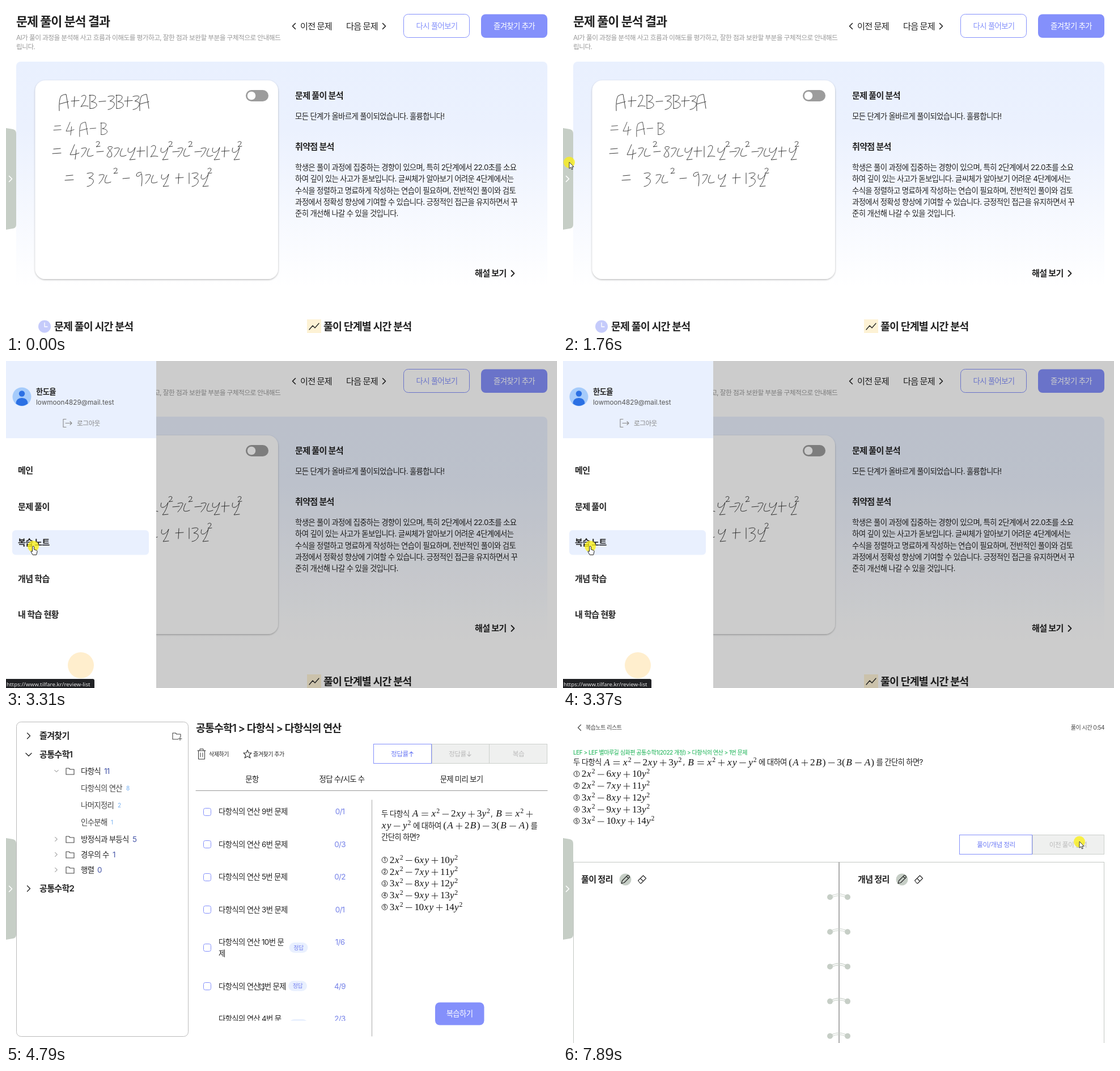
Write an HTML page that moves like this. It is 972x576 px and loops after 8 s.

```html
<!DOCTYPE html>
<html lang="ko">
<head>
<meta charset="utf-8">
<title>복습 노트</title>
<style>
html, body { margin: 0; width: 100%; height: 100%; overflow: hidden; background: #fff; }
svg { display: block; width: 972px; height: 576px; }
text { font-family: Inter, "Noto Sans CJK KR", "Noto Sans CJK", sans-serif; letter-spacing: -.05em; }
.math { font-family: "Liberation Serif", serif; letter-spacing: 0; }
.url { font-family: "Noto Sans", sans-serif; letter-spacing: 0; }
.mail text { letter-spacing: 0; }
.line { fill: none; stroke-linecap: round; stroke-linejoin: round; }

/* 8 s loop: 1% = 80 ms */
.step { animation: 8s step-end infinite; }
#result { animation-name: result; }
#list { animation-name: list; }
#note { animation-name: note; }
#empty { animation-name: empty; }
#preview { animation-name: preview; }
#picked { animation-name: picked; }
#status { animation-name: status; }
#halo { animation-name: halo; }
#arrow { animation-name: arrow; }
#hand { animation-name: status; }
#dim { animation: dim 8s linear infinite; }
#drawer { animation: drawer 8s linear infinite; }
#cursor { animation: cursor 8s linear infinite; }

@keyframes result { 0% { opacity: 1 } 42.5%, to { opacity: 0 } }
@keyframes list { 0% { opacity: 0 } 42.5% { opacity: 1 } 80.87%, to { opacity: 0 } }
@keyframes note { 0% { opacity: 0 } 80.87%, to { opacity: 1 } }
@keyframes empty { 0% { opacity: 1 } 59.8%, to { opacity: 0 } }
@keyframes preview { 0% { opacity: 0 } 59.8%, to { opacity: 1 } }
@keyframes picked { 0% { opacity: 0 } 41.3%, to { opacity: 1 } }
@keyframes status { 0% { opacity: 0 } 31.2% { opacity: 1 } 49.6%, to { opacity: 0 } }
@keyframes arrow {
  0% { opacity: 0 } 2.37% { opacity: 1 } 14.37% { opacity: 0 } 18.5% { opacity: 1 }
  31.2% { opacity: 0 } 49.6%, to { opacity: 1 }
}
@keyframes halo {
  0% { opacity: 0 } 20.2% { opacity: 1 } 22.7% { opacity: 0 } 41.3% { opacity: 1 } 43% { opacity: 0 }
  58.2% { opacity: 1 } 59.8% { opacity: 0 } 78.9% { opacity: .8 } 80.87% { opacity: 0 } 97%, to { opacity: 1 }
}
@keyframes dim {
  0%, 22.5% { opacity: 0; animation-timing-function: ease-out }
  24.2%, 42.1% { opacity: 1; animation-timing-function: ease-in-out }
  45.6%, to { opacity: 0 }
}
@keyframes drawer {
  0%, 22.6% { transform: translateX(-266px); animation-timing-function: cubic-bezier(0, 0, .2, 1) }
  26.1%, 42.1% { transform: none; animation-timing-function: cubic-bezier(.4, 0, .6, 1) }
  45.6%, to { transform: translateX(-266px) }
}
@keyframes cursor {
  0%, 2.3% { transform: translate(886px, 566px); animation-timing-function: ease-in-out }
  10.25%, 17.6% { transform: translate(-2px, 284px) }
  20.2%, 27.8% { transform: translate(11px, 275px); animation-timing-function: ease-in-out }
  36.2%, 48.1% { transform: translate(48px, 326px); animation-timing-function: ease-in-out }
  54.9%, 62.5% { transform: translate(448px, 471px); animation-timing-function: ease-in-out }
  73.2%, 85.2% { transform: translate(793px, 526px); animation-timing-function: ease-in }
  88.2% { transform: translate(773px, 465px); animation-timing-function: ease-out }
  95.2% { transform: translate(902px, 237px) }
  96.2%, to { transform: translate(911px, 221px) }
}
</style>
</head>
<body>
<svg id="stage" viewBox="0 0 972 576"></svg>
<script>
const BLUE = '#8490fb', INK = '#222', GREY = '#bbb', SAGE = '#c6cec6', PALE = '#eff0ef', SKY = '#e9f0fe';
// type scale
const XS = 10.05, S = 11.72, M = 13.4, L = 15.1, XL = 18.4, XXL = 21.8;

// y is the visual middle of the line
const text = (x, y, size, str, fill = INK, weight = 400, anchor = 'start') =>
  `<text x="${x}" y="${y + size * .36}" font-size="${size}" fill="${fill}" font-weight="${weight}" text-anchor="${anchor}">${str.replace(/>/g, '&gt;')}</text>`;
const mid = (x, y, size, str, fill, weight) => text(x, y, size, str, fill, weight, 'middle');
const rect = (x, y, w, h, r, fill, stroke = 'none') =>
  `<rect x="${x}" y="${y}" width="${w}" height="${h}" rx="${r}" fill="${fill}" stroke="${stroke}"/>`;
const disc = (x, y, r, fill, stroke = 'none') => `<circle cx="${x}" cy="${y}" r="${r}" fill="${fill}" stroke="${stroke}"/>`;
const line = (d, stroke = INK, width = 1.1, x = 0, y = 0, scale = 1) =>
  `<path class="line" d="${d}" stroke="${stroke}" stroke-width="${width}" transform="translate(${x} ${y}) scale(${scale})"/>`;
const group = (id, body, cls = 'step') => `<g id="${id}" class="${cls}">${body}</g>`;
const right = (x, y, s = 5, c = INK, w = 1.6) => line(`M${-s / 2} ${-s}L${s / 2} 0 ${-s / 2} ${s}`, c, w, x, y);
const left = (x, y, s = 5, c = INK, w = 1.6) => line(`M${s / 2} ${-s}L${-s / 2} 0 ${s / 2} ${s}`, c, w, x, y);
const down = (x, y, s = 5, c = INK, w = 1.3) => line(`M${-s} ${-s / 2}L0 ${s / 2} ${s} ${-s / 2}`, c, w, x, y);

// handwriting, each glyph drawn around its middle line
const pen = {
  'A': 'M1 16Q0-3 4-10Q9-13 13-13Q15-2 17 12M2 4 17 0',
  'B': 'M1-12V12M0-11Q12-13 11-7Q9-1 3 0Q14 1 13 7Q9 13 1 12',
  '+': 'M0-1 14-2M6-9 5 9',
  '-': 'M0 0 12-1',
  '=': 'M2-5 14-6M0 3 15 2',
  '1': 'M1-10V9',
  '2': 'M1-9Q7-14 9-9Q9-3 0 9Q5 6 13 8',
  '3': 'M0-9Q10-12 11-8Q9-3 3-1Q13 0 11 6Q8 13 0 14',
  '4': 'M8-13Q4-3 0 5Q8 6 16 2M11-4Q10 6 9 13',
  '8': 'M10-9Q2-11 3-6Q12 2 9 8Q4 11 1 7Q2 2 11-8',
  '9': 'M9-11Q0-12 0-5Q3-1 9-9Q11 0 9 13',
  'x': 'M0-6Q10-9 9-5Q6 3 0 9M14-6Q9 3 11 7Q14 9 21 6',
  'y': 'M2-7Q-1 2 5 1Q11-1 14-8Q11 6 4 14L14 13',
  '^': 'M0-17Q4-20 6-17Q6-13 0-9L7-10'
};
const write = (y, str, xs, scale) => [...str].map((c, i) => line(pen[c], '#3a3a3a', 1, xs[i], y, scale)).join('');

// math typesetting with advances in em
const EM = 16.2;
const advance = { x: .572, y: .526, A: .75, B: .809, '(': .389, ')': .389 };
function math(x, y, str) {
  let out = '', raised = false;
  for (const c of str) {
    if (c === '^') { raised = true; continue; }
    if ('+-='.includes(c)) {
      const gap = c === '=' ? .278 : .222, a = x + (gap + .06) * EM, w = .66 * EM;
      const d = { '+': `M0 0h${w}M${w / 2} ${-w / 2}v${w}`, '-': `M0 0h${w}`, '=': `M0-2h${w}M0 2h${w}` }[c];
      out += line(d, INK, .9, a, y + 1);
      x += (.778 + 2 * gap) * EM;
      continue;
    }
    const w = (raised ? .4 : advance[c] ?? .5) * EM, style = /[a-zA-Z]/.test(c) ? 'italic' : 'normal';
    out += `<text class="math" x="${x + w / 2}" y="${raised ? y - .9 : y + 5.3}" font-size="${raised ? EM * .72 : EM * 1.06}" font-style="${style}" text-anchor="middle" fill="#111">${c}</text>`;
    x += w;
    raised = false;
  }
  return out;
}
const options = (x, y) => ['2x^2-6xy+10y^2', '2x^2-7xy+11y^2', '3x^2-8xy+12y^2', '3x^2-9xy+13y^2', '3x^2-10xy+14y^2']
  .map((o, i) => {
    const row = y + i * 20.75;
    return disc(x + 6, row, 4.9, 'none', INK) + mid(x + 5.8, row, 7.5, `${i + 1}`, INK, 600) + math(x + 15, row, o);
  }).join('');
const polyA = 'A=x^2-2xy+3y^2', goal = '(A+2B)-3(B-A)';

const result = [
  text(18, 27, XXL, '문제 풀이 분석 결과', INK, 600),
  text(18, 55.5, S, 'AI가 풀이 과정을 분석해 사고 흐름과 이해도를 평가하고, 잘한 점과 보완할 부분을 구체적으로 안내해드', '#999'),
  text(18, 72, S, '립니다.', '#999'),
  left(508, 35.5), text(519, 35.5, L, '이전 문제', INK, 500),
  text(600, 35.5, L, '다음 문제', INK, 500), right(667, 35.5),
  rect(701.5, 14.5, 116, 41, 8, '#fff', BLUE), mid(760, 35.5, M, '다시 풀어보기', BLUE),
  rect(838, 14.5, 117, 41.5, 8, BLUE), mid(896.5, 35.5, M, '즐겨찾기 추가', '#fff'),
  rect(18, 98, 937, 478, 8, 'url(#fade)'),
  `<g filter="url(#soft)">${rect(51.5, 131, 428.5, 350, 18, '#fff')}</g>`,
  rect(423, 148, 40, 20, 10, '#9c9c9c'), disc(433, 158, 7.3, '#fff'),
  write(168.5, 'A+2B-3B+3A', [93, 115, 132, 147, 164, 180, 194, 209, 224, 235]),
  write(216, '=4A-B', [84, 106, 129, 148, 167], .88),
  write(257, '=4x^-8xy+12y^-x^-xy+y^', [82, 113, 133, 159, 160, 177, 191, 214, 231, 248, 255, 272, 287, 294, 303, 322, 333, 344, 363, 380, 398, 409]),
  write(304, '=3x^-9xy+13y^', [104, 143, 164, 190, 206, 230, 246, 273, 299, 322, 328, 343, 356]),
  text(510, 158, L, '문제 풀이 분석', INK, 600),
  text(510, 194.5, M, '모든 단계가 올바르게 풀이되었습니다. 훌륭합니다!'),
  text(510, 248, L, '취약점 분석', INK, 600),
  ...['학생은 풀이 과정에 집중하는 경향이 있으며, 특히 2단계에서 22.0초를 소요',
    '하여 깊이 있는 사고가 돋보입니다. 글씨체가 알아보기 어려운 4단계에서는',
    '수식을 정렬하고 명료하게 작성하는 연습이 필요하며, 전반적인 풀이와 검토',
    '과정에서 정확성 향상에 기여할 수 있습니다. 긍정적인 접근을 유지하면서 꾸',
    '준히 개선해 나갈 수 있을 것입니다.'].map((s, i) => text(510, 284.5 + i * 20.1, M, s)),
  text(827, 471, L, '해설 보기', INK, 600), right(894, 471, 5, INK, 1.8),
  disc(68, 564.5, 11, '#c5cbfb'), line('M0-6V1H5', '#fff', 1.3, 68, 564),
  text(85, 564, XL, '문제 풀이 시간 분석', INK, 600),
  rect(531, 552, 25, 24, 0, '#fdf2d5'), line('M535 570 541 563 545 567 552 559', INK, 1.3),
  text(560, 564, XL, '풀이 단계별 시간 분석', INK, 600)
].join('');

const folder = (x, y) => line('M-7-5H-2L0-3H7V6H-7Z', '#444', 1.1, x, y);
const branch = (y, name, count, countX, open) =>
  (open ? down(89, y, 3.2, '#777', 1) : right(88.5, y, 3.6, '#777', 1)) +
  folder(113, y) + text(132, y, M, name) + text(countX, y, M, count, '#4656a8');
const leaf = (y, name, count, countX) => text(132, y, M, name, '#444') + text(countX, y, XS, count, '#74aef0');
const row = (y, name, score, box = y) =>
  rect(348.5, Math.round(box) - 6.5, 13, 13, 3, '#fff', BLUE) + text(375, y, M, `다항식의 연산 ${name}`) + mid(589, y, M, score, '#7480e8');
const badge = (x, y) => rect(x - 16.5, y - 9, 33, 18, 9, SKY) + mid(x, y, XS, '정답', '#7784f0');
const button = (fill, ink) => rect(757, 504.5, 86.5, 40, 8, fill) + mid(800, 524.5, M, '복습하기', ink);

const list = [
  rect(18.5, 10.5, 303, 554, 8, '#fff', '#bbb'),
  right(40, 35, 5, INK, 1.3), text(59, 35, L, '즐겨찾기', INK, 600),
  folder(301, 35), rect(304, 37, 6, 6, 0, '#fff'), line('M0-3V3M-3 0H3', '#444', 1, 307, 40),
  down(40, 68), text(59, 68, L, '공통수학1', INK, 600),
  branch(97, '다항식', '11', 173, true),
  leaf(127, '다항식의 연산', '8', 212), leaf(157, '나머지정리', '2', 197), leaf(187, '인수분해', '1', 185),
  branch(217, '방정식과 부등식', '5', 223), branch(244, '경우의 수', '1', 188), branch(271, '행렬', '0', 161),
  right(40, 304, 5, INK, 1.3), text(59, 304, L, '공통수학2', INK, 600),
  text(335, 21, XL, '공통수학1 > 다항식 > 다항식의 연산', INK, 600),
  line('M-7-6H7M-3-6V-9H3V-6M-5.5-6V9H5.5V-6M-2-2V5M2-2V5', '#333', 1, 345, 67),
  text(358, 67, XS, '삭제하기'),
  line('M0-7 2-2 7-2 3 2 5 7 0 4-5 7-3 2-7-2-2-2Z', '#333', 1.1, 426, 67),
  text(436, 67, XS, '즐겨찾기 추가'),
  rect(751.5, 49.5, 101, 34, 0, PALE, '#ccd0cc'), rect(852.5, 49.5, 102, 34, 0, PALE, '#ccd0cc'),
  rect(648.5, 49.5, 102, 34, 0, '#fff', BLUE),
  text(679, 67, S, '정답률', '#6f7df5'), line('M0 4.5V-4M-3-1 0-4 3-1', '#6f7df5', 1.1, 715, 67),
  text(781, 67, S, '정답률', GREY), line('M0-4.5V4M-3 1 0 4 3 1', GREY, 1.1, 817, 67),
  mid(904, 67, S, '복습', GREY),
  mid(434, 111, M, '문항', INK, 500), mid(592.5, 111, M, '정답 수/시도 수', INK, 500), mid(803.5, 111, M, '문제 미리 보기', INK, 500),
  line('M335 131.5H955', '#999', 1), line('M645.5 148V564', '#aaa', 1),
  '<g clip-path="url(#rows)">',
  row(168.5, '9번 문제', '0/1'), row(226, '6번 문제', '0/3'), row(283.5, '5번 문제', '0/2'), row(341, '3번 문제', '0/1'),
  row(398, '10번 문', '1/6', 408), text(375, 418, M, '제'), badge(516, 408),
  row(476, '1번 문제', '4/9'), badge(514.5, 475.5),
  row(533, '4번 문', '2/3', 550), badge(516, 543), '</g>',
  group('empty', mid(800.5, 319.5, M, '문제를 선택해주세요', '#888') + button(PALE, '#aaa')),
  group('preview', [
    button(BLUE, '#fff'),
    text(662, 172, M, '두 다항식'), math(716, 172, polyA), text(855, 172, M, ','), math(863, 172, 'B=x^2+'),
    math(662, 193, 'xy-y^2'), text(718, 193, M, '에 대하여'), math(771, 193, goal), text(925.5, 193, M, '를'),
    text(662, 213, M, '간단히 하면?'), options(662, 253.5)
  ].join(''))
].join('');

const tools = x => disc(x, 288, 10.5, SAGE) +
  line('M-7 7-5.5 2 4-7.5Q7-7 7.5-4L-2 5.5ZM2-5.5 5.5-2', INK, 1.1, x, 288) +
  line('M-7 2 2-7 7-2-2 7H-3ZM-3-2 2 3', INK, 1.1, x + 29.5, 288);
const ring = y => disc(471, y, 5, SAGE) + disc(502, y, 5, SAGE) +
  line('M471-1Q487-10 502-1M473 1Q487-6 500 1', SAGE, 1.1, 0, y);

const note = [
  left(29, 20.5, 5, '#444', 1.2), text(40, 20.5, XS, '복습노트 리스트', '#444'),
  text(955, 20.5, XS, '풀이 시간 0:54', '#444', 400, 'end'),
  text(18, 64.5, XS, 'LEF > LEF 별마루길 심화편 공통수학1(2022 개정) > 다항식의 연산 > 1번 문제', '#12b04f'),
  text(18, 81.5, M, '두 다항식'), math(71.5, 81.5, polyA), text(211.5, 81.5, M, ','), math(219, 81.5, 'B=x^2+xy-y^2'),
  text(345, 81.5, M, '에 대하여'), math(398, 81.5, goal), text(552.5, 81.5, M, '를 간단히 하면?'),
  options(18, 102),
  rect(828.5, 209.5, 126, 34, 0, PALE, '#ccd0cc'), rect(699.5, 209.5, 128, 34, 0, '#fff', BLUE),
  mid(764, 227, S, '풀이/개념 정리', '#6f7df5'), mid(891, 227, S, '이전 풀이 분석', GREY),
  rect(18.5, 257.5, 936, 340, 0, '#fff', '#c4c8c4'), line('M487 258V580', '#888', 1.4),
  text(32, 288, L, '풀이 정리', INK, 600), tools(110),
  text(520, 288, L, '개념 정리', INK, 600), tools(598),
  ...[0, 1, 2, 3, 4].map(i => ring(319 + i * 61.2))
].join('');

const drawer = [
  rect(0, 0, 265, 576, 0, '#fff'), rect(0, 0, 265, 136, 0, SKY),
  disc(28, 63, 16.5, '#a5cbfb'), disc(28, 57.5, 5.2, '#2b70e4'),
  '<path d="M17.5 75Q18 65 28 65T38.5 75Q28 83 17.5 75Z" fill="#2b70e4"/>',
  text(53, 54, M, '한도율', INK, 600), `<g class="mail">${text(53, 73, S, 'lowmoon4829@mail.test', '#555')}</g>`,
  line('M-2-7H-7V7H-2M-3 0H8M5-3 8 0 5 3', '#888', 1.1, 108, 109.5), text(125, 109.5, S, '로그아웃', '#888'),
  group('picked', rect(11, 298, 241, 43.5, 6, SKY)),
  ...['메인', '문제 풀이', '복습 노트', '개념 학습', '내 학습 현황'].map((s, i) => text(21, 193 + i * 63.5, L, s, INK, 600)),
  disc(132, 536, 23, '#ffeecd')
].join('');

document.getElementById('stage').innerHTML = `
<defs>
  <linearGradient id="fade" x2="0" y2="1"><stop offset="0" stop-color="${SKY}"/><stop offset=".25" stop-color="#ebf1fe"/><stop offset=".83" stop-color="#fff"/></linearGradient>
  <filter id="soft" x="-5%" y="-5%" width="110%" height="110%"><feDropShadow dx="0" dy="1.2" stdDeviation="1.6" flood-opacity=".3"/></filter>
  <clipPath id="rows"><path d="M335 140H645V537H335Z"/></clipPath>
</defs>` +
  group('result', result) + group('list', list) + group('note', note) +
  `<path d="M0 215 12 217Q18 218 18 225V385Q18 391 12 392L0 394Z" fill="${SAGE}"/>` + right(8, 304.5, 5, '#fff', 1.6) +
  group('dim', rect(0, 0, 972, 576, 0, 'rgba(0,0,0,.2)'), '') +
  group('drawer', drawer, '') +
  group('status', '<path d="M0 560H153Q156 560 156 563V576H0Z" fill="#212225"/>' +
    '<text class="url" x="1" y="572.5" font-size="9.8" fill="#e4e4e4">https://www.tilfare.kr/review-list</text>') +
  group('cursor',
    group('halo', disc(0, .5, 10, 'rgba(250,238,20,.78)')) +
    group('arrow', '<path d="M0 0V11.3L2.6 8.9 4.5 13 6.3 12.2 4.5 8.3H8Z" fill="#fff" stroke="#222" stroke-width=".9"/>') +
    group('hand', '<path d="M-1.5 1Q0-1 1.4 1V6L6 7.5Q7.2 8 7 10L5.6 15.5H-.8L-4 9.8Q-4.2 8-1.5 9.6Z" fill="#fff" stroke="#222"/>'), '');
</script>
</body>
</html>
```
